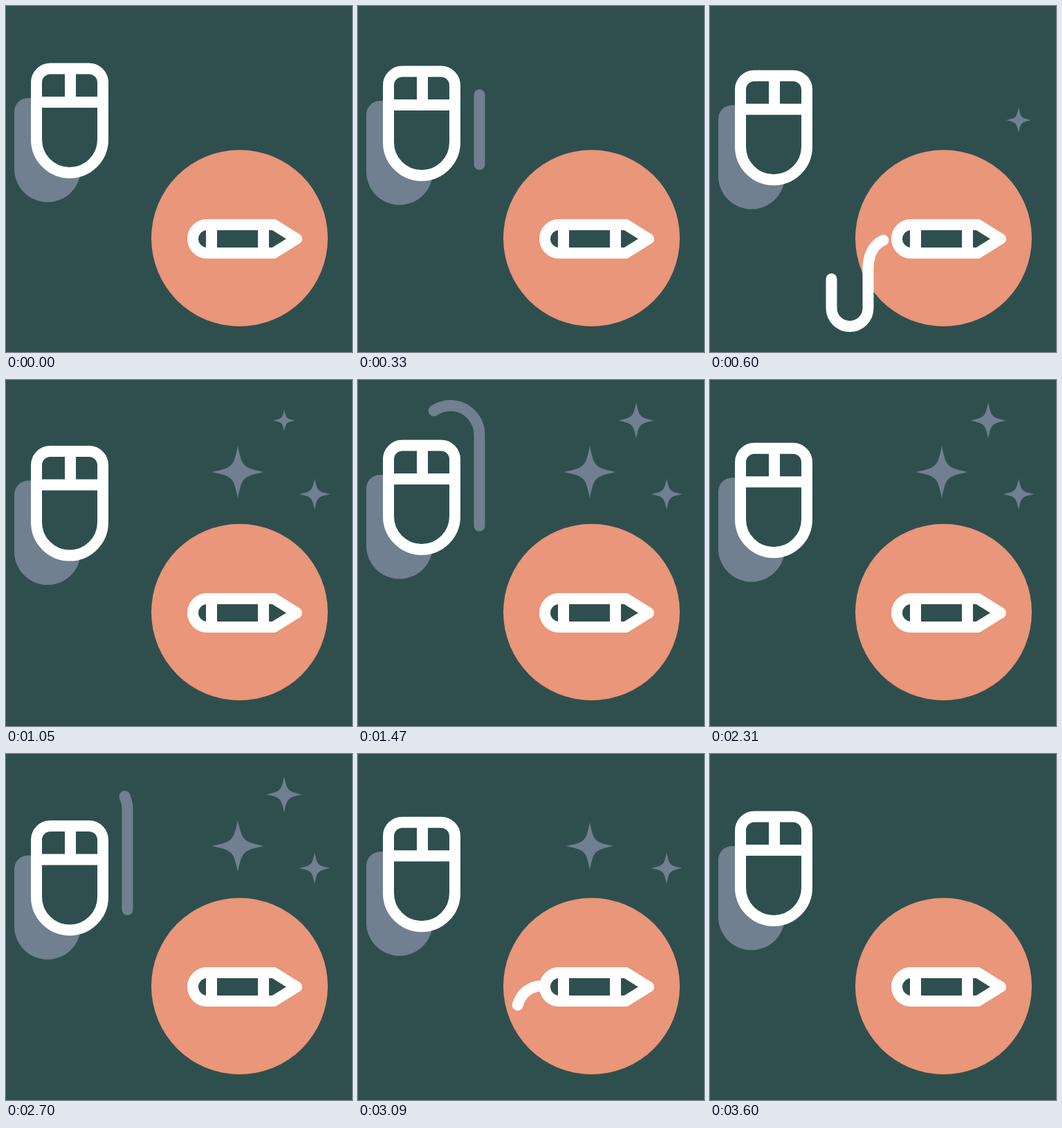
An HTML page for the animation above (3.66 s loop, 500 by 500 pixels).

```html
<!DOCTYPE html>
<html lang="en">
<head>
<meta charset="utf-8">
<title>Mouse and pencil</title>
<style>
  html, body { margin: 0; width: 100%; height: 100%; overflow: hidden; background: #2f4f4f; }
  svg { display: block; width: 100vw; height: 100vh; }
  .line { fill: none; stroke: #fff; stroke-width: 16; stroke-linecap: round; stroke-linejoin: round; }
  .body { fill: #2f4f4f; }
  .slate { fill: #708090; }
  #upper { stroke: #708090; }
</style>
</head>
<body>
<svg viewBox="0 0 500 500">
  <defs>
    <path id="shell" d="M64 90.5H120A20 20 0 0 1 140 110.5V193A48 48 0 0 1 44 193V110.5A20 20 0 0 1 64 90.5Z"/>
    <path id="spark" d="M0-1C.17-.2 .2-.17 1 0C.2 .17 .17 .2 0 1C-.17 .2-.2 .17-1 0C-.2-.17-.17-.2 0-1Z"/>
  </defs>
  <g class="slate" id="stars"></g>
  <circle cx="337.5" cy="335.5" r="127.5" fill="#e9967a"/>
  <path id="upper" class="line" d="M91.5 89V79A42 42 0 0 1 175.5 79V229"/>
  <path id="lower" class="line" d="M175.5 342V436.5A26.5 26.5 0 0 0 228.5 436.5V380C228.5 355 240.5 335 268.5 335"/>
  <g id="mouse">
    <use href="#shell" class="slate" x="-32" y="42.5"/>
    <use href="#shell" class="line body"/>
    <path class="line" stroke-linecap="butt" d="M44 139H140M93 92V139"/>
  </g>
  <path class="line body" d="M290.5 316H387L420 336.5L387 357H290.5A20.5 20.5 0 0 1 290.5 316Z"/>
  <path class="line" d="M297 318V355M372 318V355"/>
</svg>
<script>
const LOOP = 3660, LAST = 3600, PULSE = 1200, BOB = 1800;
const byId = id => document.getElementById(id);
const clamp = v => Math.min(1, Math.max(0, v));
const inOut = p => p < .5 ? 2 * p * p : 1 - 2 * (1 - p) ** 2;
const rush = p => 1 - (1 - p ** 1.5) ** 4;

const mouse = byId('mouse');

const cords = [['upper', 120], ['lower', 450]].map(([id, start]) => {
  const el = byId(id);
  return { el, start, len: el.getTotalLength() };
});

// x, y, radius, time of appearing, time of leaving
const stars = [
  [446, 165, 22.4, 400, 3166],
  [335, 133, 37.4, 635, 3030],
  [402, 58.5, 26, 890, 2805]
].map(([x, y, r, on, off]) => {
  const el = document.createElementNS('http://www.w3.org/2000/svg', 'use');
  el.setAttribute('href', '#spark');
  byId('stars').append(el);
  return { el, x, y, r, on, off };
});

function drawCord({ el, start, len }, t) {
  const at = delay => len * rush(clamp((t - start - delay) / 240));
  const head = at(0), tail = at(120);
  const shown = head - tail > .1;
  el.style.visibility = shown ? 'visible' : 'hidden';
  if (!shown) return;
  el.setAttribute('stroke-dasharray', `${head - tail} ${len * 2}`);
  el.setAttribute('stroke-dashoffset', -tail);
}

function drawStar({ el, x, y, r, on, off }, t) {
  const grow = from => inOut(clamp((t - from) / 290));
  const size = r * (grow(on) - grow(off));
  el.style.visibility = size > .05 ? 'visible' : 'hidden';
  el.setAttribute('transform', `translate(${x} ${y}) scale(${size})`);
}

function draw(time) {
  const t = Math.min(time % LOOP, LAST);
  const bob = 6.75 * (1 - Math.cos(2 * Math.PI * t / BOB));
  mouse.setAttribute('transform', `translate(0 ${bob})`);
  cords.forEach(c => drawCord(c, t % PULSE));
  stars.forEach(s => drawStar(s, t));
}

const begin = performance.now();
function tick() {
  draw(performance.now() - begin);
  requestAnimationFrame(tick);
}
tick();
</script>
</body>
</html>
```
